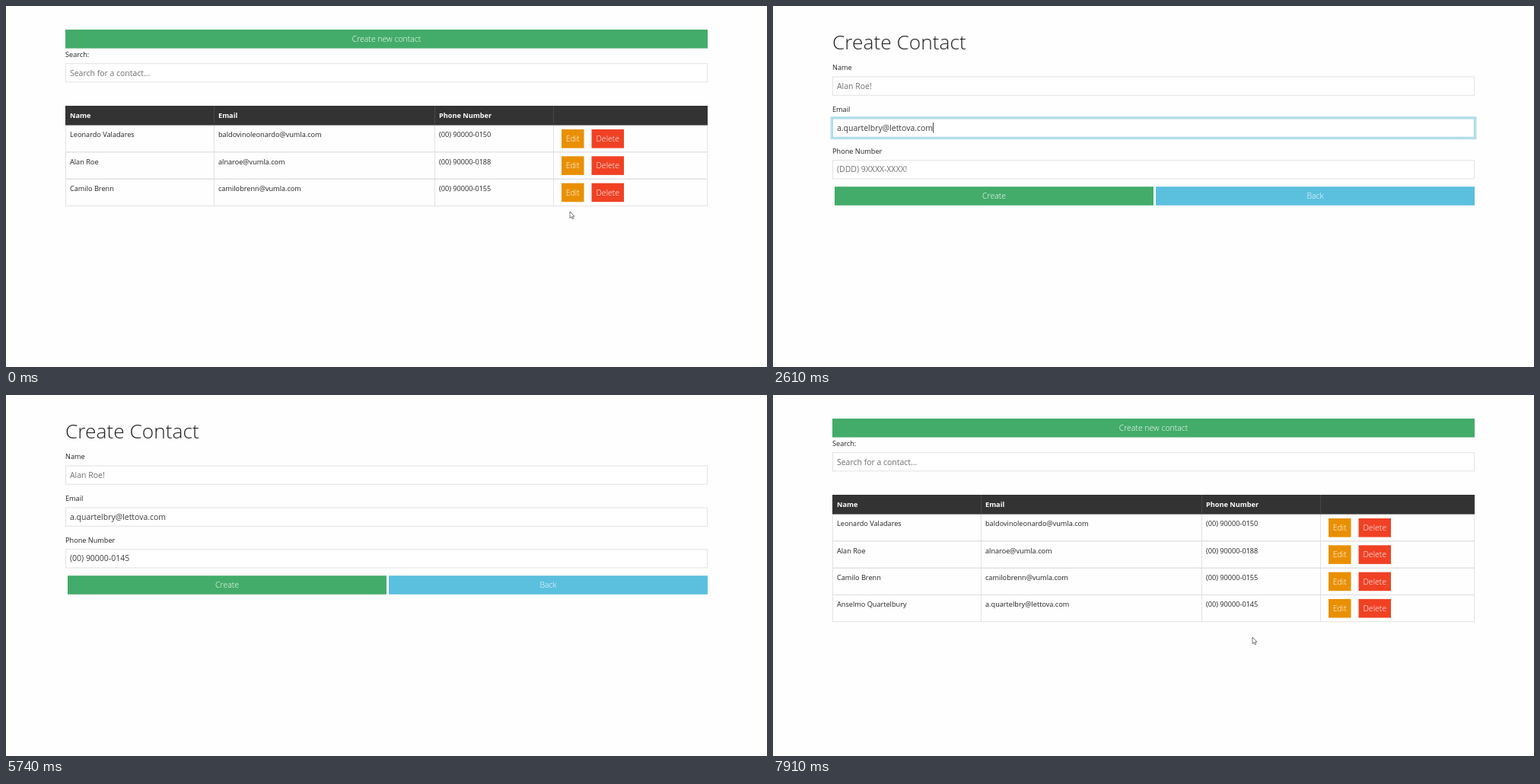
These frames come from a looping animation (1000x474 px, 8000 ms). An HTML page:

```html
<!DOCTYPE html>
<html lang="en">
<head>
<meta charset="utf-8">
<title>Contact list</title>
<style>
  html, body { margin: 0; width: 100%; height: 100%; overflow: hidden; background: #fefefe; }
  svg { display: block; width: 100vw; height: 100vh; font: 9.17px "Open Sans", sans-serif; fill: #222; }
  .title { font-size: 26.3px; font-weight: 300; }
  .head { font-weight: 700; fill: #fff; }
  .button { font-size: 10.5px; font-weight: 300; fill: #fff; text-anchor: middle; }
  .input { font-size: 10.47px; fill: #3c3c3c; }
  .hint { font-size: 10.47px; fill: #707070; }
  .line { fill: none; stroke: #dfdfdf; stroke-width: .9; }
  .pointer { fill: #fff; stroke: #555; stroke-width: .8; stroke-linejoin: round; }
</style>
</head>
<body>
<svg viewBox="0 0 1000 474" id="stage"></svg>
<script>
const LOOP = 8000;
const GREEN = '#43ac6a', BLUE = '#5bc0de', AMBER = '#e99002', RED = '#f04124';
const OPEN_FORM = 710, SAVED = 7340;
const ROW_TOP = 156.5, ROW_H = 35.3;
const COLUMNS = [84, 279, 569];

const contacts = [
  ['Leonardo Valadares', 'baldovinoleonardo@vumla.com', '(00) 90000-0150'],
  ['Alan Roe', 'alnaroe@vumla.com', '(00) 90000-0188'],
  ['Camilo Brenn', 'camilobrenn@vumla.com', '(00) 90000-0155'],
  ['Anselmo Quartelbury', 'a.quartelbry@lettova.com', '(00) 90000-0145']
];

// focus: ring fades in over the first pair and out over the second
const fields = [
  { label: 'Name', hint: 'Alan Roe!', value: contacts[3][0], y: 93,
    focus: [6740, 6880, 9000, 9100], typing: [6920, 7120], blinkOff: [9000, 9000] },
  { label: 'Email', hint: 'alanroe@vumla.com!', value: contacts[3][1], y: 148,
    focus: [1300, 1460, 2870, 3080], typing: [1370, 1540], blinkOff: [2080, 2610] },
  { label: 'Phone Number', hint: '(DDD) 9XXXX-XXXX!', value: contacts[3][2], y: 202.7,
    focus: [4350, 4500, 5610, 5740], typing: [4430, 4680], blinkOff: [5090, 5610] }
];

// pointer moves: start, end, from x, y, to x, y
const moves = [
  [0, 110, 741, 270, 741, 270],
  [110, 290, 741, 270, 500, 41],
  [710, 960, 500, 41, 191, 138],
  [1010, 1160, 191, 138, 190, 156],
  [7130, 7220, 240, 103, 284, 242],
  [7570, 7910, 284, 242, 630, 318]
];

function add(parent, tag, attrs = {}, text = '') {
  const el = document.createElementNS('http://www.w3.org/2000/svg', tag);
  set(el, attrs);
  el.textContent = text;
  return parent.appendChild(el);
}
function set(el, attrs) {
  for (const key in attrs) el.setAttribute(key, attrs[key]);
}
const show = (el, on) => { el.style.display = on ? '' : 'none'; };
const ramp = (t, a, b) => Math.max(0, Math.min(1, (t - a) / (b - a)));
const label = (parent, x, y, text, cls = '') => add(parent, 'text', { x, y, class: cls }, text);
const box = (parent, x, y, width, height, attrs) =>
  add(parent, 'rect', { x, y, width, height, ...attrs });

function button(parent, x, y, w, text, fill, h = 24.6) {
  const rect = box(parent, x, y, w, h, { fill });
  label(parent, x + w / 2, y + h / 2 + 3.8, text, 'button');
  return rect;
}
function input(parent, y) {
  box(parent, 78.5, y, 843, 24.2, { fill: '#fff' });
  return box(parent, 78.5, y, 843, 24.2, { class: 'line' });
}

const stage = document.getElementById('stage');
const list = add(stage, 'g'), form = add(stage, 'g');

// contact list
const newButton = button(list, 78, 31, 844, 'Create new contact', GREEN);
label(list, 78, 67, 'Search:');
input(list, 75.7);
label(list, 84, 91.6, 'Search for a contact...', 'hint');
const rows = contacts.map((cells, i) => {
  const row = add(list, 'g'), y = ROW_TOP + i * ROW_H;
  const back = box(row, 78.5, y, 843, ROW_H, { class: 'line' });
  add(row, 'path', { class: 'line', d: [273.5, 563.5, 719.5].map(x => `M${x} ${y}v${ROW_H}`).join('') });
  cells.forEach((cell, c) => label(row, COLUMNS[c], y + 15.8, cell));
  button(row, 730, y + 5.5, 29.5, 'Edit', AMBER);
  button(row, 769.5, y + 5.5, 42.5, 'Delete', RED);
  return { row, back };
});
box(list, 78, 131, 844, 25.5, { fill: '#333' });
add(list, 'path', { d: 'M273.5 131v25.5M563.5 131v25.5M719.5 131v25.5', stroke: '#4a4a4a', 'stroke-width': .9 });
['Name', 'Email', 'Phone Number'].forEach((text, c) => label(list, COLUMNS[c], 147.3, text, 'head'));

// form
label(form, 78, 57, 'Create Contact', 'title');
for (const f of fields) {
  label(form, 78, f.y - 9, f.label);
  f.ring = box(form, 77, f.y - 1.5, 846, 27.2, { fill: 'none', stroke: '#b7e1ec', 'stroke-width': 3 });
  f.frame = input(form, f.y);
  f.text = label(form, 84, f.y + 15.7, '', 'input');
  f.caret = box(form, 84, f.y + 5, .9, 13.5, { fill: '#333' });
}
const createButton = button(form, 81, 237.2, 419, 'Create', GREEN);
button(form, 503, 237.2, 419, 'Back', BLUE);

// pointers
const arrow = add(stage, 'path', { class: 'pointer', d: 'M0 0V8.5L2 6.8 3.4 9.8 4.7 9.2 3.4 6.2H6Z' });
const hand = add(stage, 'path', { class: 'pointer',
  d: 'M0 .8Q.9-.6 1.8.8V4.3L6 5.2Q6.8 5.5 6.6 6.6L6 9.8V11.5H.5V10L-2.7 6.7Q-3-.2 0 7.2Z'.replace('Q-3-.2', 'Q-2.4 5.3') });
const beam = add(stage, 'path', { class: 'pointer', d: 'M-2 0H2M0 0V9M-2 9H2' });

function drawField(f, t) {
  const [start, full, end, gone] = f.focus;
  const glow = ramp(t, start, full) * (1 - ramp(t, end, gone));
  const count = Math.round(f.value.length * ramp(t, ...f.typing));
  const value = f.value.slice(0, count);
  f.text.textContent = value || f.hint;
  set(f.text, { class: value ? 'input' : 'hint' });
  set(f.ring, { opacity: glow });
  f.frame.style.stroke = glow > .5 ? '#9bd3e2' : '';
  const blink = t >= f.blinkOff[0] && t < f.blinkOff[1];
  show(f.caret, t >= start && t < end && !blink);
  set(f.caret, { x: 84 + (value ? f.text.getComputedTextLength() : 0) });
}

function drawPointer(t, onForm) {
  const [a, b, x0, y0, x1, y1] = moves.filter(m => t >= m[0]).pop();
  const k = ramp(t, a, b), e = k * k * (3 - 2 * k);
  const x = x0 + (x1 - x0) * e, y = y0 + (y1 - y0) * e;
  const visible = t < 1380 || t >= 7130;
  const onNew = !onForm && y < 55;
  const onCreate = onForm && t > 7130 && y > 237;
  const onField = onForm && fields.some(f => y > f.y && y < f.y + 24);
  const useHand = onNew || onCreate || (t >= SAVED && t < 7570);
  show(hand, visible && useHand);
  show(beam, visible && !useHand && onField);
  show(arrow, visible && !useHand && !onField);
  for (const p of [hand, beam, arrow]) set(p, { transform: `translate(${x} ${y})` });

  set(newButton, { fill: onNew ? '#389058' : GREEN });
  set(createButton, { fill: onCreate ? '#389058' : GREEN });
  rows.forEach(({ back }, i) => {
    const top = ROW_TOP + i * ROW_H;
    back.style.fill = y >= top && y < top + ROW_H ? '#ebebeb' : '';
  });
}

function draw(now) {
  const t = now % LOOP;
  const onForm = t >= OPEN_FORM && t < SAVED;
  show(list, !onForm);
  show(form, onForm);
  show(rows[3].row, t >= SAVED);
  if (onForm) fields.forEach(f => drawField(f, t));
  drawPointer(t, onForm);
}

const begin = performance.now();
function tick() {
  draw(performance.now() - begin);
  requestAnimationFrame(tick);
}
tick();
</script>
</body>
</html>
```
